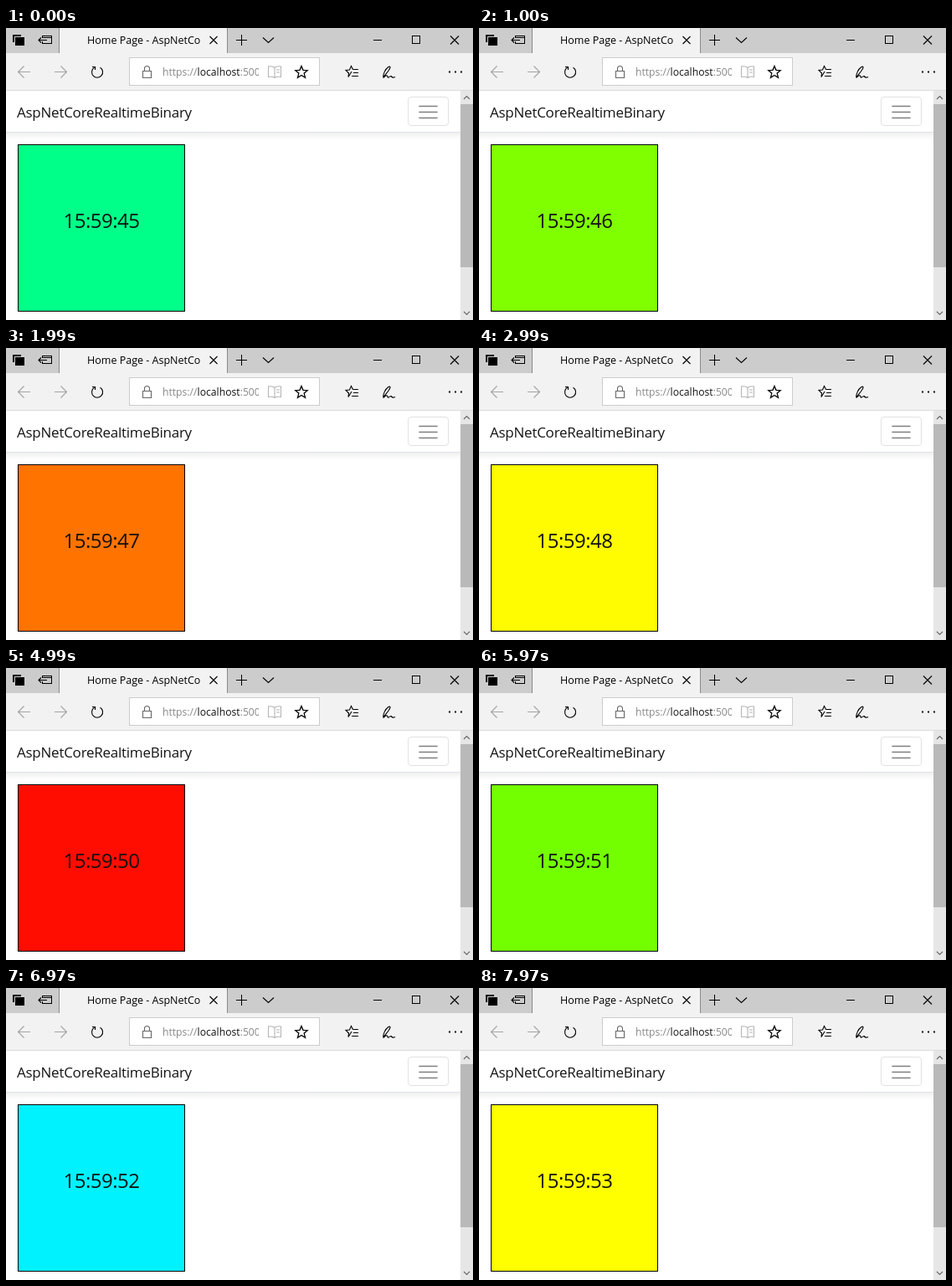
An HTML page that plays this animation: 558 px wide and 349 px high, repeating every 8 s.

```html
<!DOCTYPE html>
<html lang="en">
<head>
<meta charset="utf-8">
<title>Home Page</title>
<style>
  html, body { margin: 0; width: 100%; height: 100%; overflow: hidden; background: #fff; }
  svg { display: block; width: 558px; height: 349px; }
  text { font-family: "Open Sans", "Noto Sans", sans-serif; }
  .line { fill: none; stroke: #000; stroke-width: 1.1; }
  .crisp { shape-rendering: crispEdges; }
  .off { stroke: #a3a3a3; }
  .grey { stroke: #666; }
  #clock { font-size: 24px; letter-spacing: -.5px; text-anchor: middle; fill: #111; }
</style>
</head>
<body>
<svg viewBox="0 0 558 349">
  <defs>
    <clipPath id="tabClip"><rect x="95" y="4" width="138" height="24"/></clipPath>
    <clipPath id="urlClip"><rect x="185" y="38" width="117" height="28"/></clipPath>
    <linearGradient id="shade" x2="0" y2="1">
      <stop offset="0" stop-color="#000" stop-opacity=".06"/>
      <stop offset="1" stop-color="#000" stop-opacity="0"/>
    </linearGradient>
    <path id="star" d="M0-7 2-2.2 7.2-1.8 3.2 1.6 4.5 6.8 0 4-4.5 6.8-3.2 1.6-7.2-1.8-2-2.2Z"/>
  </defs>

  <!-- title bar -->
  <rect width="558" height="30" fill="#ccc"/>
  <rect y="30" width="558" height="45" fill="#f2f2f2"/>
  <rect x="64" width="201" height="31" fill="#f2f2f2"/>
  <g class="crisp" fill="#8a8a8a">
    <rect x="63" width="1" height="30"/>
    <rect x="264" width="1" height="30"/>
  </g>
  <g class="crisp">
    <path d="M8 8h10v2H10v7H8ZM11 11h11v10H11Z"/>
    <path class="line" d="M43.500 12V9.500H54.500V18.500H43.500V16M44 11.500H54M39 14.500H49"/>
  </g>
  <path class="line" d="M42 11.500 39 14.500 42 17.500"/>
  <text x="97" y="19" font-size="12.500" clip-path="url(#tabClip)">Home Page - AspNetCoreRealtimeBinary</text>
  <path class="line" d="M243.500 10 252.500 19M252.500 10 243.500 19"/>
  <path class="line crisp" d="M275 14.500H288M281.500 8V21"/>
  <path class="line" stroke-width="1" d="M307 11.500 313.500 17.500 320 11.500"/>
  <path class="line crisp" d="M439 14.500H449M485.500 9.500H494.500V18.500H485.500Z"/>
  <path class="line" d="M531 9.500 541 19.500M541 9.500 531 19.500"/>

  <!-- toolbar -->
  <path class="line off" d="M29 52.500H14.500M21.500 45.500 14.500 52.500 21.500 59.500"/>
  <path class="line off" d="M58 52.500H72.500M65.500 45.500 72.500 52.500 65.500 59.500"/>
  <path class="line" stroke-width="1.300" d="M105.500 47.300A6.500 6.500 0 1 0 112.500 47.200M103 46.500H106.500V50"/>
  <rect class="crisp" x="147.500" y="35.500" width="227" height="33" fill="#fff" stroke="#ccc"/>
  <path class="line grey" d="M163.500 51.500H173.500V59.500H163.500ZM165.500 51.500V48.500a3 3 0 0 1 6 0V51.500"/>
  <text x="187" y="57" font-size="12.200" fill="#888" clip-path="url(#urlClip)">https://<tspan fill="#111">localhost</tspan>:5001</text>
  <path class="line" style="stroke:#b5b5b5" d="M321 47.500C319 45.500 316 45.500 313.500 46V58.500C316 58 319 58 321 59.500 323 58 326 58 328.500 58.500V46C326 45.500 323 45.500 321 47.500V59.500M323 50H327M323 53H327"/>
  <use href="#star" class="line" style="stroke-width:1.300" x="353" y="52.500"/>
  <path class="line" stroke-width="1.300" d="M413 52 409 58.500 409.500 54 406 50.500 410.500 50 412.500 45.500 414.500 49.500H421M415 53.500H421M413 57.500H421"/>
  <path class="line" stroke-width="1.300" d="M451 59.500C450 56 453 49 457 46.500 460 45 459.500 48 457 51 455 54 452 57 451 59.500 454 56 456 56 456 58.500 456.500 60.500 459 57 460.500 57.500 461 59.500 463 59.500 465 58.500"/>
  <path d="M529 51.500h2v2h-2zM536 51.500h2v2h-2zM543 51.500h2v2h-2z"/>
  <rect y="74" width="558" height="1" fill="#dadada"/>

  <!-- page -->
  <rect y="75" width="543" height="274" fill="#fff"/>
  <rect y="125" width="543" height="9" fill="url(#shade)"/>
  <rect y="124" width="543" height="1" fill="#dee2e6"/>
  <text x="13" y="107" font-size="17" letter-spacing="-.25" fill="#151515">AspNetCoreRealtimeBinary</text>
  <rect x="480.500" y="82.500" width="48" height="34" rx="3.500" fill="none" stroke="#e2e2e2"/>
  <path d="M494 93.500H515M494 100.500H515M494 107.500H515" stroke="#7f7f7f" stroke-width="1.600" stroke-linecap="round"/>
  <rect id="tile" class="crisp" x="14.500" y="139.500" width="199" height="199" stroke="#000"/>
  <text id="clock" x="114" y="239"></text>

  <!-- scrollbar -->
  <rect x="543" y="75" width="15" height="274" fill="#e6e6e6"/>
  <rect x="543" y="91" width="15" height="195" fill="#b9b9b9"/>
  <path class="line grey" d="M547 85 550.500 81.500 554 85M547 339 550.500 342.500 554 339"/>
</svg>
<script>
  const LOOP = 8000;
  const ticks = [
    [0, '#00ff88'], [1000, '#7fff00'], [1990, '#ff7300'],
    [2990, '#fffb00'], [3970, '#7bff00'], [4990, '#ff0d00'],
    [5970, '#73ff00'], [6970, '#00f2ff'], [7970, '#ffff00']
  ];
  const tile = document.getElementById('tile');
  const clock = document.getElementById('clock');
  let shown = -1;

  function draw() {
    const time = performance.now() % LOOP;
    const i = ticks.filter(([start]) => start <= time).length - 1;
    if (i !== shown) {
      shown = i;
      tile.setAttribute('fill', ticks[i][1]);
      clock.textContent = `15:59:${45 + i}`;
    }
    requestAnimationFrame(draw);
  }
  draw();
</script>
</body>
</html>
```
